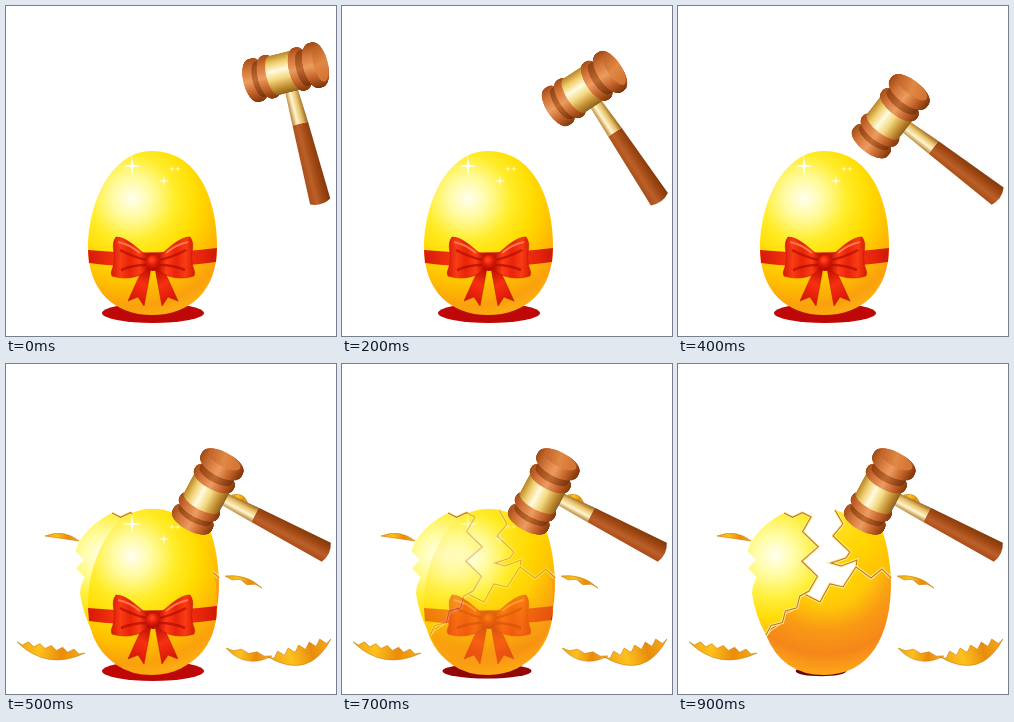
Recreate the animation shown at these times as an HTML page with a canvas. Size 330 by 330 pixels, loop 1.3 s.

```html
<!DOCTYPE html>
<html>
<head>
<meta charset="utf-8">
<title>Golden egg</title>
<style>
html, body { margin: 0; width: 100%; height: 100%; overflow: hidden; background: #fff; }
canvas { display: block; }
</style>
</head>
<body>
<canvas id="stage" width="330" height="330"></canvas>
<script>
const SIZE = 330, STEP = 100, LOOP = 1300, HIT = 5;
const stage = document.getElementById('stage');
let c = stage.getContext('2d');

function stops(g, colors) {
  colors.forEach((col, i) => g.addColorStop(i / (colors.length - 1), col));
  return g;
}
const linear = (x0, y0, x1, y1, ...cols) => stops(c.createLinearGradient(x0, y0, x1, y1), cols);
const radial = (x, y, r, ...cols) => stops(c.createRadialGradient(x, y, 0, x, y, r), cols);

function shape(d, fill, stroke, width = 1) {
  const p = new Path2D(d);
  if (fill) { c.fillStyle = fill; c.fill(p); }
  if (stroke) { c.strokeStyle = stroke; c.lineWidth = width; c.stroke(p); }
}

function oval(x, y, rx, ry, fill) {
  c.fillStyle = fill;
  c.beginPath();
  c.ellipse(x, y, rx, ry, 0, 0, 7);
  c.fill();
}

// Points of a zigzag with n strokes between two ends.
function zig(x0, y0, x1, y1, n, amp) {
  const dx = x1 - x0, dy = y1 - y0, len = Math.hypot(dx, dy);
  let d = 'L';
  for (let i = 0; i <= n; i++) {
    const off = i % n ? (i % 2 ? amp : -amp) / len : 0;
    d += `${x0 + dx * i / n - dy * off} ${y0 + dy * i / n + dx * off} `;
  }
  return d;
}

function star(x, y, r) {
  c.fillStyle = '#fff';
  c.beginPath();
  for (let i = 0; i < 8; i++) {
    const a = i * Math.PI / 4, q = i % 2 ? r * .17 : r;
    c.lineTo(x + q * Math.cos(a), y + q * Math.sin(a));
  }
  c.fill();
}

function ribbon() {
  shape('M82 244Q146 250 211 242L210 256Q146 265 83 257Z',
    linear(82, 0, 211, 0, '#d81808', '#f83a10', '#c01004', '#f83410', '#d01808'));
  c.save();
  c.translate(147, 256);
  const dark = '#b80c04';
  for (const side of [-1, 1]) {
    c.save();
    c.scale(side, 1);
    shape('M2 6L9 44 15 35 25 39 10 6Z', linear(0, 6, 18, 40, '#b00c04', '#f83010', '#d81408'), dark, .5);
    shape('M5 -5C15 -13 26 -25 37 -25C43 -17 37 -9 39 0C40 8 43 9 41 14C28 18 14 16 5 8Z',
      linear(4, 0, 42, 0, '#b80c04', '#ff3c14', '#e82408', '#f83c14', '#d81808'), dark, .5);
    shape('M7 -2Q22 -6 33 -12M7 3Q20 3 32 8', null, '#b00c04b0', 2.5);
    shape('M13 -9Q24 -18 35 -20', null, '#ff784c', 2);
    c.restore();
  }
  oval(0, 1, 7, 8, radial(-1, -2, 9, '#ff5028', '#e82008', '#b80c04'));
  c.restore();
}

function wholeEgg() {
  shape('M146 145C190 145 211 190 211 241C211 285 184 309 146 309C108 309 82 285 82 241C82 197 105 145 146 145Z',
    radial(126, 192, 130, '#fffff0', '#fffa98', '#ffec28', '#ffdc00', '#ffc000', '#faa00c', '#ffb818'));
  ribbon();
  star(126, 160, 10);
  star(158, 175, 6);
  star(166, 163, 3.5);
  star(172, 163, 3.5);
}

function cutEdge(d) {
  shape(d, null, '#ffeca0', 3);
  shape(d, null, '#c07c10', 1.1);
}

function brokenEgg() {
  const right = 'M157 146L165 160 155 172 172 188 168 194 153 199 163 202 179 196 178 204';
  const body = 'M88 271' + zig(92, 266, 126, 230, 5, 2) + '142 238 152 220 165 223 178 203 193 214 204 205 213 214';
  const left = 'M106 149' + zig(106, 149, 133, 153, 3, 3) + zig(133, 153, 131, 227, 5, 8) + zig(131, 227, 88, 271, 6, 3);

  shape(right + 'L193 216 213 216Q211 180 202 162Z', linear(155, 150, 212, 215, '#ffe630', '#ffd400', '#ffb808'));
  cutEdge(right);
  shape(body + 'C214 275 190 311 146 311Q104 311 88 271Z',
    radial(148, 194, 120, '#ffdc00', '#ffd800', '#ffc808', '#f99a14', '#f5861a', '#ffac18'));
  cutEdge(body);
  shape(left + 'Q77 251 74 229' + zig(75, 222, 73, 178, 5, 4) + 'Q86 158 106 149Z',
    radial(97, 191, 84, '#fffff0', '#fffca0', '#fff040', '#ffdc08', '#ffb810'));
  cutEdge(left);
}

function shard(x0, y0, x1, y1, teeth, amp, bulge) {
  const dx = x1 - x0, dy = y1 - y0, k = bulge / Math.hypot(dx, dy);
  const qx = (x0 + x1) / 2 - dy * k, qy = (y0 + y1) / 2 + dx * k;
  shape(`M${x0} ${y0}${zig(x0, y0, x1, y1, teeth, amp)}Q${qx} ${qy} ${x0} ${y0}Z`,
    linear(x0, y0, x1, y1, '#f0a414', '#ffc01c', '#e88c0c', '#f8b018'), '#c8800c', .6);
}

function shards() {
  shard(11, 278, 79, 289, 12, 2, 24);
  shard(39, 172, 73, 177, 1, 0, -10);
  shard(219, 212, 256, 224, 5, 1.5, -9);
  shard(220, 284, 266, 292, 6, 1.5, 18);
  shard(262, 293, 325, 275, 12, 3, 34);
  shard(226, 131, 242, 140, 2, 1, -9);
}

// A turned section of the gavel head, its rim rounded off by `round`.
function bead(x, half, r, fill, round = .15) {
  for (let u = -1; u <= 1; u += .1) {
    const ry = r * (1 - round * u ** 4);
    oval(x + half * u, 0, ry * .38, ry, fill);
  }
}

function hammer(deg) {
  const wood = linear(0, -23, 0, 23, '#a04a14', '#d4763a', '#ec9c60', '#c4622a', '#7c3408');
  const groove = linear(0, -20, 0, 20, '#8a3c10', '#c06a30', '#702c08');
  const brass = linear(0, -21, 0, 21, '#b07c20', '#f0cc68', '#fffbe0', '#f4d880', '#c89438', '#8a5a14');
  c.save();
  c.translate(309, 185);
  c.rotate(-deg * Math.PI / 180);
  shape('M-6 -69H10L13 11Q3 17 -8 12Z', linear(-8, 0, 13, 0, '#a84c18', '#bc602a', '#a04814', '#803808'));
  shape('M-5 -104H8L10 -69H-6Z', linear(-6, 0, 10, 0, '#b8802c', '#fff6d0', '#e8c068', '#94601c'));
  c.translate(0, -122);
  bead(-31, 5, 22, wood);
  bead(-24, 3, 18, groove, 0);
  bead(-17, 4, 22, wood);
  bead(-1, 11, 20, brass, 0);
  bead(15, 4, 22, wood);
  bead(22, 4, 18, groove, 0);
  bead(31, 5, 23, wood);
  oval(36, 0, 7, 18, linear(30, -18, 40, 18, '#bc5c24', '#e08844', '#d07030'));
  c.restore();
}

const eggLayer = document.createElement('canvas');
eggLayer.width = eggLayer.height = SIZE;
c = eggLayer.getContext('2d');
wholeEgg();
c = stage.getContext('2d');

function draw(time) {
  const k = Math.floor(time % LOOP / STEP);
  const fade = Math.min(4, Math.max(0, k - HIT));
  c.clearRect(0, 0, SIZE, SIZE);

  // The whole egg fades over the broken one; its gaps open in the last two steps.
  if (fade < 3) c.drawImage(eggLayer, 0, 0);
  if (k >= HIT) {
    brokenEgg();
    c.globalCompositeOperation = fade < 3 ? 'source-over' : 'source-atop';
    c.globalAlpha = 1 - fade / 4;
    c.drawImage(eggLayer, 0, 0);
    c.globalAlpha = 1;
  }
  c.globalCompositeOperation = 'destination-over';
  oval(147 - fade, 307, 51 - 1.6 * fade ** 2, 10 - 1.2 * fade, `rgb(${190 - 22 * fade} 8 8)`);
  c.globalCompositeOperation = 'source-over';

  if (k >= HIT) shards();
  hammer(14 + 9.6 * Math.min(k, HIT));
}

const start = performance.now();
function tick() {
  draw(performance.now() - start);
  requestAnimationFrame(tick);
}
tick();
</script>
</body>
</html>
```
